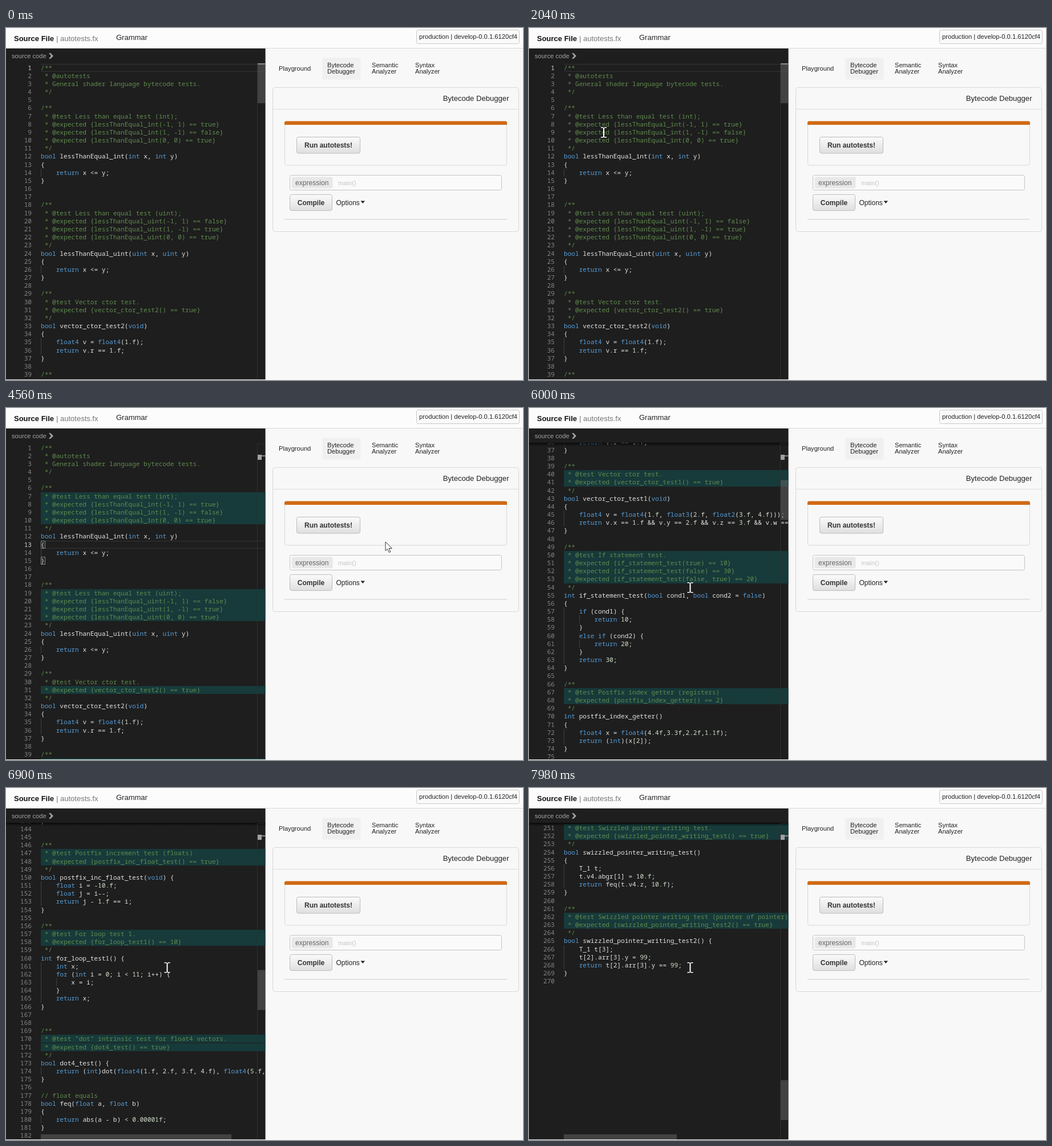
Write an HTML page with a canvas that moves like this. It is 906 by 618 pixels and loops after 8 s.

```html
<!DOCTYPE html>
<html lang="en">
<head>
<meta charset="utf-8">
<title>Bytecode Debugger</title>
<style>
html, body { margin: 0; width: 100%; height: 100%; overflow: hidden; background: #f8f8f8; }
canvas { display: block; }
</style>
</head>
<body>
<canvas id="stage" width="906" height="618"></canvas>
<script>
const LINES = `/**
 * @autotests
 * General shader language bytecode tests.
 */

/**
 * @test Less than equal test (int);
 * @expected {lessThanEqual_int(-1, 1) == true}
 * @expected {lessThanEqual_int(1, -1) == false}
 * @expected {lessThanEqual_int(0, 0) == true}
 */
bool lessThanEqual_int(int x, int y)
{
    return x <= y;
}


/**
 * @test Less than equal test (uint);
 * @expected {lessThanEqual_uint(-1, 1) == false}
 * @expected {lessThanEqual_uint(1, -1) == true}
 * @expected {lessThanEqual_uint(0, 0) == true}
 */
bool lessThanEqual_uint(uint x, uint y)
{
    return x <= y;
}

/**
 * @test Vector ctor test.
 * @expected {vector_ctor_test2() == true}
 */
bool vector_ctor_test2(void)
{
    float4 v = float4(1.f);
    return v.r == 1.f;
}

/**
 * @test Vector ctor test.
 * @expected {vector_ctor_test1() == true}
 */
bool vector_ctor_test1(void)
{
    float4 v = float4(1.f, float3(2.f, float2(3.f, 4.f)));
    return v.x == 1.f && v.y == 2.f && v.z == 3.f && v.w == 4.f;
}

/**
 * @test If statement test.
 * @expected {if_statement_test(true) == 10}
 * @expected {if_statement_test(false) == 30}
 * @expected {if_statement_test(false, true) == 20}
 */
int if_statement_test(bool cond1, bool cond2 = false)
{
    if (cond1) {
        return 10;
    }
    else if (cond2) {
        return 20;
    }
    return 30;
}

/**
 * @test Postfix index getter (registers)
 * @expected {postfix_index_getter() == 2}
 */
int postfix_index_getter()
{
    float4 x = float4(4.4f,3.3f,2.2f,1.1f);
    return (int)(x[2]);
}

/**
 * @test Postfix index setter.
 * @expected {postfix_index_setter() == 5}
 */
int postfix_index_setter()
{
    int x[3];
    x[1] = 5;
    return x[1];
}

/**
 * @test Nested call test.
 * @expected {nested_call_test(2) == 6}
 * @expected {nested_call_test(4) == 20}
 */
int nested_call_inner(int a) { return a + 1; }

int nested_call_test(int a)
{
    return a * nested_call_inner(a);
}

/**
 * @test While loop test.
 * @expected {while_loop_test() == 8}
 */
int while_loop_test()
{
    int i = 0;
    while (i < 8) {
        i++;
    }
    return i;
}

/**
 * @test Prefix increment test (int)
 * @expected {prefix_inc_int_test() == 11}
 */
int prefix_inc_int_test() {
    int i = 10;
    return ++i;
}

/**
 * @test Prefix increment test (floats)
 * @expected {prefix_inc_float_test() == true}
 */
bool prefix_inc_float_test(void) {
    float i = 10.f;
    float j = ++i;
    return j == 11.f;
}


/**
 * @test Postfix increment test (int)
 * @expected {postfix_inc_int_test() == true}
 */
bool postfix_inc_int_test(void)
{
    int i = 10;
    int j = i++;
    int k = i--;

    return j == 10 && k == 11;
}


/**
 * @test Postfix increment test (floats)
 * @expected {postfix_inc_float_test() == true}
 */
bool postfix_inc_float_test(void) {
    float i = -10.f;
    float j = i--;
    return j - 1.f == i;
}

/**
 * @test For loop test 1.
 * @expected {for_loop_test1() == 10}
 */
int for_loop_test1() {
    int x;
    for (int i = 0; i < 11; i++) {
        x = i;
    }
    return x;
}


/**
 * @test "dot" intrinsic test for float4 vectors.
 * @expected {dot4_test() == true}
 */
bool dot4_test() {
    return (int)dot(float4(1.f, 2.f, 3.f, 4.f), float4(5.f, 6.f, 7.f, 8.f)) == 70;
}

// float equals
bool feq(float a, float b)
{
    return abs(a - b) < 0.00001f;
}

bool feq4(float4 a, float4 b)
{
    return feq(a.x, b.x) && feq(a.y, b.y) && feq(a.z, b.z) && feq(a.w, b.w);
}

/**
 * @test Vector swizzle test.
 * @expected {swizzle_test() == true}
 */
bool swizzle_test()
{
    float4 v = float4(1.f, 2.f, 3.f, 4.f);
    return feq(v.wzyx.x, 4.f);
}

/**
 * @test Swizzle writing test.
 * @expected {swizzle_writing_test() == true}
 */
bool swizzle_writing_test() {
    float4 v = float4(0.f);
    v.yx = float2(1.f, 2.f);
    return feq(v.x, 2.f) && feq(v.y, 1.f);
}

/**
 * @test Structure field test.
 * @expected {struct_field_test() == 7}
 */
struct S_1
{
    int a;
    int b[2];
};

int struct_field_test()
{
    S_1 s;
    s.a = 3;
    s.b[1] = 4;
    return s.a + s.b[1];
}

/**
 * @test Array index test.
 * @expected {array_index_test(1) == 2}
 * @expected {array_index_test(2) == 4}
 */
int array_index_test(int i)
{
    int x[3];
    x[i] = i * 2;
    return x[i];
}


// pointer types
struct T_1
{
    float4 v4;
    float4 arr[4];
};

float4 make_float4(float x) {
    return float4(x);
}

/**
 * @test Swizzled pointer writing test.
 * @expected {swizzled_pointer_writing_test() == true}
 */
bool swizzled_pointer_writing_test()
{
    T_1 t;
    t.v4.abgr[1] = 10.f;
    return feq(t.v4.z, 10.f);
}

/**
 * @test Swizzled pointer writing test (pointer of pointer)
 * @expected {swizzled_pointer_writing_test2() == true}
 */
bool swizzled_pointer_writing_test2() {
    T_1 t[3];
    t[2].arr[3].y = 99;
    return t[2].arr[3].y == 99;
}
`.split('\n');

const ctx = document.getElementById('stage').getContext('2d');
const SANS = '"Liberation Sans", Arial, sans-serif';
const MONO = '11.12px "Noto Sans Mono", monospace';
const LOOP = 8000, TICK = 60;
const LEFT = 61, RIGHT = 454.6, TOP = 62.6, BOTTOM = 617, ROW = 14.17, CHAR = 6.672;
const PAGE = 506, RULER = 441, RULER_STEP = 1.8;

// Pointer path: time, x, y
const PATH = [
  [540, 896, 52], [660, 800, 102], [780, 685, 160], [900, 575, 205], [1020, 549, 233],
  [1200, 549, 233], [1500, 420, 303], [1680, 250, 260], [1860, 150, 139], [2040, 131, 183],
  [2280, 95, 184], [2700, 302, 184], [3060, 302, 184], [3120, 306.5, 221], [3360, 300, 240],
  [3480, 300, 240], [3720, 450, 225], [3900, 545, 212], [4200, 545, 212], [4560, 664.5, 234.5],
  [5400, 664.5, 234.5], [5460, 600, 250], [5580, 340, 308], [5640, 282.5, 315]
];
const SCROLLS = [6000, 6300, 6480, 6900, 7020, 7200, 7860];
const HBAR = [[7260, 198], [6960, 262], [6060, 334]];
const PRESS = 2280, CLICK = 3360, RUN = 4200;
const SEL_LINE = 9, SEL_COL = 5;

const rowY = (line, scroll) => TOP + (line - 1) * ROW - scroll;
const colX = col => LEFT + col * CHAR;

// Tests are keyed by title, so a repeated title marks only its last line.
const isMarked = (text, i) => /@test |@expected/.test(text) && LINES.lastIndexOf(text) === i;

function rect(x, y, w, h, color) {
  ctx.fillStyle = color;
  ctx.fillRect(x, y, w, h);
}

function box(x, y, w, h, r, fill, stroke) {
  ctx.beginPath();
  ctx.roundRect(x + .5, y + .5, w - 1, h - 1, r);
  if (fill) { ctx.fillStyle = fill; ctx.fill(); }
  if (stroke) { ctx.strokeStyle = stroke; ctx.lineWidth = 1; ctx.stroke(); }
}

function label(text, x, y, size, color, weight = '', align = 'left') {
  ctx.font = `${weight} ${size}px ${SANS}`;
  ctx.textAlign = align;
  ctx.fillStyle = color;
  ctx.fillText(text, x, y);
}

function shape(points, fill, stroke) {
  ctx.beginPath();
  points.forEach(([x, y]) => ctx.lineTo(x, y));
  ctx.closePath();
  ctx.fillStyle = fill;
  ctx.fill();
  if (stroke) { ctx.strokeStyle = stroke; ctx.lineWidth = 1; ctx.stroke(); }
}

function button(text, x, y, w, h, hover) {
  const g = ctx.createLinearGradient(0, y, 0, y + h);
  g.addColorStop(0, hover ? '#f4f4f4' : '#fbfbfb');
  g.addColorStop(1, hover ? '#d0d0d0' : '#dedede');
  box(x, y, w, h, 3, g, '#bcbcbc');
  label(text, x + w / 2, y + h / 2 + 4, 12, '#333', 'bold', 'center');
}

function pointerAt(t) {
  if (t < PATH[0][0]) return null;
  const i = PATH.findIndex(p => p[0] > t);
  if (i < 0) return PATH[PATH.length - 1].slice(1);
  const [t0, x0, y0] = PATH[i - 1], [t1, x1, y1] = PATH[i];
  const k = (t - t0) / (t1 - t0);
  return [x0 + (x1 - x0) * k, y0 + (y1 - y0) * k];
}

const onButton = p => !!p && p[0] > 509 && p[0] < 621 && p[1] > 191 && p[1] < 220;

const TOKEN = /\b(bool|u?int|float[234]?|void|return|if|else|for|while|struct|true|false)\b|\b(\d+(?:\.\d*)?f?)/g;

function drawCode(text, y) {
  const put = (s, col, color) => {
    ctx.fillStyle = color;
    ctx.fillText(s, colX(col), y);
  };
  if (/^\s*(\/\*|\*|\/\/)/.test(text)) {
    put(text, 0, '#608b4e');
    return;
  }
  let last = 0;
  for (const m of text.matchAll(TOKEN)) {
    put(text.slice(last, m.index), last, '#e2e2e2');
    put(m[0], m.index, m[1] ? '#569cd6' : '#d2e0ca');
    last = m.index + m[0].length;
  }
  put(text.slice(last), last, '#e2e2e2');
}

function drawEditor(t, pointer) {
  const scroll = PAGE * SCROLLS.filter(s => s <= t).length;
  const active = t < PRESS ? 1 : t < CLICK ? SEL_LINE : 13;
  const selecting = t >= PRESS && t < CLICK;
  const dragX = pointer && t < 2760 ? pointer[0] : 302;
  const selEnd = Math.max(SEL_COL, Math.round((dragX - LEFT) / CHAR));
  const selected = selecting ? LINES[SEL_LINE - 1].slice(SEL_COL, selEnd) : '';

  rect(0, 36, RIGHT, BOTTOM - 36, '#1e1e1e');
  ctx.save();
  ctx.beginPath();
  ctx.rect(0, 61, RIGHT, BOTTOM - 61);
  ctx.clip();

  LINES.forEach((text, i) => {
    const n = i + 1, y = rowY(n, scroll);
    if (y < 40 || y > 620) return;
    const top = Math.round(y), high = Math.round(y + ROW) - top;
    if (t >= RUN && isMarked(text, i)) rect(LEFT, top, RIGHT - LEFT, high, '#173a3a');
    if (n === active && !selecting) {
      rect(LEFT, top, RIGHT - LEFT, 1.5, '#2d2d2d');
      rect(LEFT, top + high - 1.5, RIGHT - LEFT, 1.5, '#2d2d2d');
    }
    if (selected && n === SEL_LINE) {
      rect(colX(SEL_COL), top, selected.length * CHAR, high, '#264f78');
    } else if (selected.length > 1 && text.includes(selected)) {
      rect(colX(text.indexOf(selected)), top, selected.length * CHAR, high, '#343a40');
    }
    if (t >= CLICK && (n === 13 || n === 15)) box(LEFT, top, 8, high, 0, '#1b251b', '#888');

    const indent = text.search(/\S/);
    for (let c = 0; c < indent - 1; c += 4) {
      if (text.startsWith('    ')) rect(Math.round(colX(c)), top, 1, high, '#404040');
    }
    ctx.font = MONO;
    ctx.textAlign = 'right';
    ctx.fillStyle = n === active ? '#d0d0d0' : '#858585';
    ctx.fillText(n, 45, y + 11);
    ctx.textAlign = 'left';
    drawCode(text, y + 11);
    if (selecting && n === SEL_LINE) rect(colX(selEnd), top, 1.5, high, '#c8c8c8');
  });

  if (scroll) {
    const g = ctx.createLinearGradient(0, 61, 0, 67);
    g.addColorStop(0, 'rgba(0,0,0,.7)');
    g.addColorStop(1, 'rgba(0,0,0,0)');
    rect(0, 61, RIGHT, 6, g);
  }
  drawRuler(t, scroll, active, selected);
  ctx.restore();

  label('source code', 10, 53, 11.14, '#a4a4a4');
  shape([[75, 44], [78, 44], [83, 49], [78, 54], [75, 54], [79, 49]], '#a4a4a4');
}

function drawRuler(t, scroll, active, selected) {
  const markY = line => 62 + (line - 1) * RULER_STEP;
  rect(RULER - 1, 62, 1, BOTTOM - 62, '#303030');
  rect(RULER - 1, 62, RIGHT - RULER + 1, 1, '#2a2a2a');
  if (selected.length > 1) {
    LINES.forEach((text, i) => {
      if (text.includes(selected)) rect(RULER + 4, markY(i + 1), 5, 4, '#858585');
    });
  }
  if (t < 4320 || t >= 5520) {
    rect(RULER, 62 + scroll * .1273, RIGHT - RULER, 70, 'rgba(121,121,121,.4)');
  }
  rect(RULER, markY(active) - (active > 1 ? .5 : 0), RIGHT - RULER, 2, '#8c8c8c');
  if (t >= CLICK) rect(RULER, 82, 7, 9, '#a0a0a0');
  const bar = HBAR.find(([from]) => t >= from);
  if (bar) rect(LEFT, 608, bar[1], 9, 'rgba(121,121,121,.4)');
}

function drawPanel(pointer) {
  rect(0, 0, 906, 618, '#f8f8f8');
  rect(0, 0, 906, 35, '#fcfcfc');
  rect(0, 35, 906, 1, '#d6d6d6');
  label('Source File', 14, 23, 13, '#111', 'bold');
  label('| autotests.fx', 88, 23, 13, '#777');
  label('Grammar', 193, 21, 13, '#222');
  box(719, 3, 181, 25, 3, '#fafafa', '#c8c8c8');
  label('production | develop-0.0.1.6120cf4', 724, 19, 11.2, '#222');

  box(554, 52, 68, 39, 3, '#f0f0f0');
  const tab = (x, y, ...rows) => rows.forEach((s, i) => label(s, x, y + i * 11, 11.14, '#222'));
  tab(478, 74.5, 'Playground');
  tab(563, 69, 'Bytecode', 'Debugger');
  tab(641, 69, 'Semantic', 'Analyzer');
  tab(717, 69, 'Syntax', 'Analyzer');

  box(467, 104, 432, 254, 4, '#f8f8f8', '#d8d8d8');
  rect(468, 142, 430, 1, '#dcdcdc');
  label('Bytecode Debugger', 881.5, 128, 13.1, '#222', '', 'right');

  box(488, 164, 390, 77.5, 3, '#f8f8f8', '#d8d8d8');
  ctx.beginPath();
  ctx.roundRect(488, 163.6, 390, 6.4, [3, 3, 0, 0]);
  ctx.fillStyle = '#d06a14';
  ctx.fill();
  button('Run autotests!', 509, 191, 112, 29.5, onButton(pointer));

  box(497, 258, 372, 27, 3, '#fafafa', '#c4c4c4');
  box(500, 261, 73, 21, 2, '#e8e8e8');
  label('expression', 507, 276, 12.1, '#666');
  label('main()', 582, 275.5, 11.2, '#c6c6c6');
  button('Compile', 497, 292, 75, 29, false);
  label('Options', 578.5, 310.5, 12, '#222');
  shape([[621.5, 303.5], [629, 303.5], [625.2, 308]], '#222');
  rect(488, 335, 390, 1.5, '#dcdcdc');
}

function drawPointer([x, y]) {
  ctx.save();
  ctx.translate(x, y);
  if (x < RIGHT && y > 62) {
    rect(-1, -8, 2, 17, '#fff');
    for (const sy of [-9, 8]) {
      rect(-5, sy, 4, 1.5, '#fff');
      rect(1, sy, 4, 1.5, '#fff');
    }
  } else if (onButton([x, y])) {
    shape([[-1, 0], [1, 0], [2, 1], [2, 6], [9, 8], [10, 10], [10, 14], [8, 19],
      [-1, 19], [-6, 12], [-6, 10], [-4, 10], [-2, 12], [-2, 1]], '#fff', '#222');
  } else {
    shape([[.5, .5], [.5, 16], [4, 12.8], [6.8, 19], [9.3, 18], [6.6, 12], [11.8, 12]], '#fff', '#333');
  }
  ctx.restore();
}

const start = performance.now();
function frame() {
  const now = (performance.now() - start) % LOOP;
  const t = Math.floor(now / TICK) * TICK;
  const pointer = pointerAt(t);
  drawPanel(pointer);
  drawEditor(t, pointer);
  if (pointer) drawPointer(pointer);
  requestAnimationFrame(frame);
}
frame();
</script>
</body>
</html>
```
